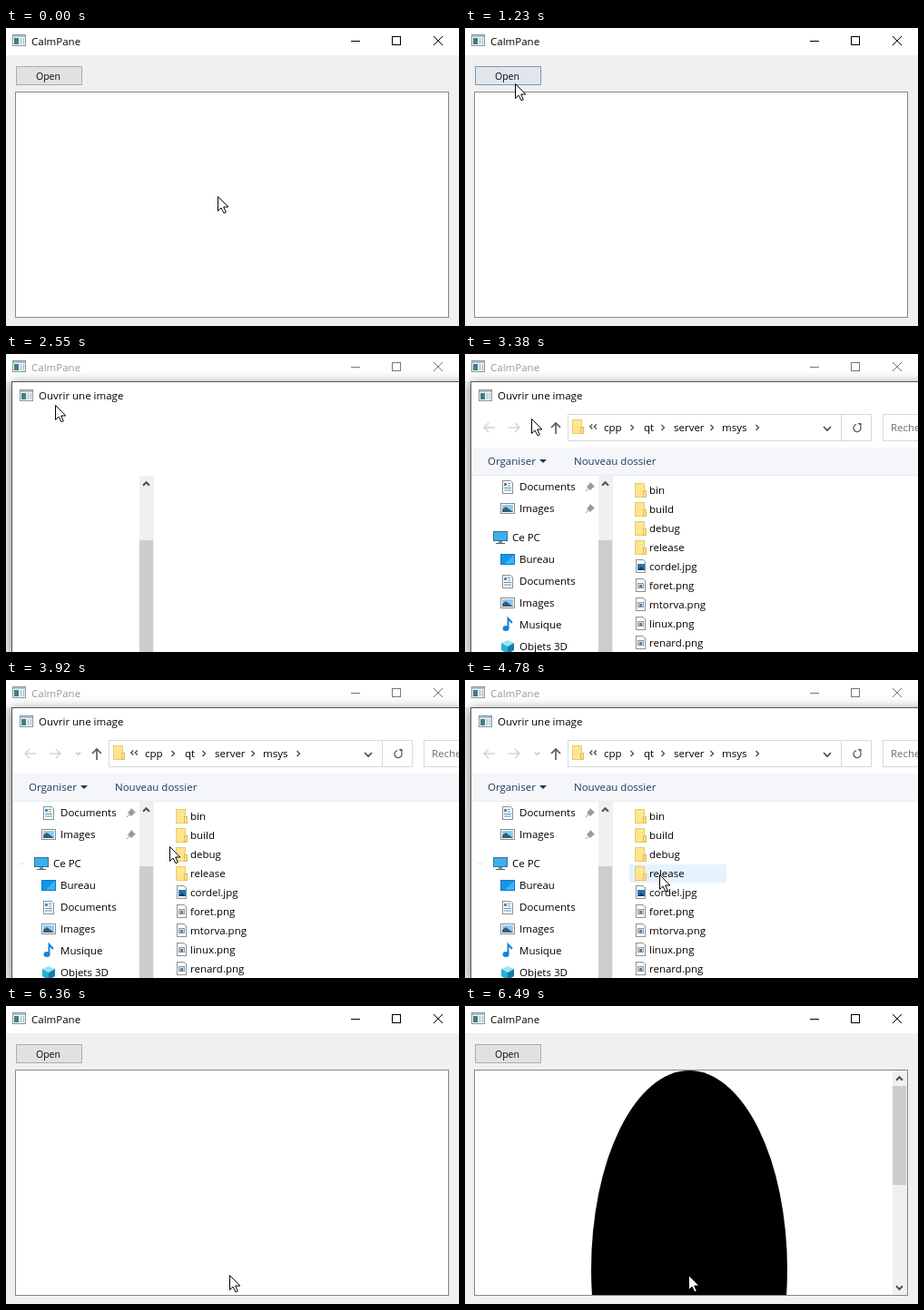
These frames come from a looping animation (499x328 px, 8 s). An HTML page with a canvas:

```html
<!DOCTYPE html>
<html lang="fr">
<head>
<meta charset="utf-8">
<title>Open dialog</title>
<style>
html, body { margin: 0; width: 100%; height: 100%; overflow: hidden; }
canvas { display: block; }
</style>
</head>
<body>
<canvas id="stage" width="499" height="328"></canvas>
<script>
const ctx = document.getElementById('stage').getContext('2d', { alpha: false });
const LOOP = 8000;

// [start time, tip x, tip y]
const pointerSteps = [
  [0, 233, 185], [500, 130, 137], [650, 75, 94], [800, 69, 78], [1230, 55, 61],
  [1620, 54, 56], [2820, 58, 57], [3100, 64, 65], [3250, 69, 68], [3380, 73, 71],
  [3530, 99, 112], [3680, 157, 146], [3800, 211, 175], [3920, 180, 183],
  [4350, 190, 185], [4780, 214, 214], [5230, 294, 318], [5380, 294, 309],
  [5530, 277, 308], [5660, 263, 303], [5810, 245, 297], [5960, 246, 296]
];
// [start time, fill, border]
const buttonSteps = [
  [0, '#e1e1e1', '#adadad'], [1230, '#e2e6ea', '#749cbb'], [1350, '#e4ecf3', '#3a8ac9'],
  [1470, '#e5f1fb', '#0078d7'], [1870, '#cce4f7', '#005499'],
  [2020, '#d7e2ec', '#5a81a3'], [2150, '#e1e1e1', '#adadad']
];
// [start time, highlighted row, fill]
const hoverSteps = [
  [0, -1], [4350, 2, '#e5f3ff'], [4780, 3, '#e5f3ff'], [5230, -1],
  [5530, 8, '#e5f3ff'], [5660, 7, '#e5f3ff'], [6210, 7, '#cce8ff']
];
const files = ['bin', 'build', 'debug', 'release', 'cordel.jpg', 'foret.png',
  'mtorva.png', 'linux.png', 'renard.png'];

const at = (steps, t) => steps.findLast(s => s[0] <= t);

function rect(x, y, w, h, fill, border) {
  ctx.fillStyle = border || fill;
  ctx.fillRect(x, y, w, h);
  if (border) rect(x + 1, y + 1, w - 2, h - 2, fill);
}

function line(points, color, width = 1) {
  ctx.beginPath();
  for (let i = 0; i < points.length; i += 2) ctx.lineTo(points[i], points[i + 1]);
  ctx.strokeStyle = color;
  ctx.lineWidth = width;
  ctx.stroke();
}

function poly(points, fill) {
  ctx.beginPath();
  for (let i = 0; i < points.length; i += 2) ctx.lineTo(points[i], points[i + 1]);
  ctx.closePath();
  ctx.fillStyle = fill;
  ctx.fill();
}

function text(s, x, y, color = '#000', size = 11.5) {
  ctx.font = `${size}px "Open Sans", "Noto Sans", sans-serif`;
  ctx.fillStyle = color;
  ctx.fillText(s, x, y);
}

// Chevrons centred on x, y
const vertical = (x, y, d, color, w = 1.5, r = 3.5) =>
  line([x - r, y - d * r / 2, x, y + d * r / 2, x + r, y - d * r / 2], color, w);
const sideways = (x, y, d, r = 3) =>
  line([x - d * r / 2, y - r, x + d * r / 2, y, x - d * r / 2, y + r], '#444', 1.2);

function appIcon(x, y) {
  rect(x, y, 15, 13, '#f4f6f8', '#8b949c');
  rect(x + 1, y + 1, 13, 2, '#a9c0d4');
  rect(x + 2, y + 4, 5, 7, '#3d8080');
  rect(x + 8, y + 4, 3, 7, '#c9d8e2');
  rect(x + 12, y + 4, 1, 7, '#aab4bb');
}

function folder(x, y) {
  rect(x, y, 11, 16, '#ffe591', '#eccb63');
  rect(x + 9, y + 8, 4, 8, '#ffe08a', '#e3bd50');
}

function page(x, y, w = 11) {
  rect(x, y, w, 15, '#fff', '#8f8f8f');
  poly([x + w - 3, y, x + w, y, x + w, y + 3], '#fff');
  line([x + w - 3, y + .5, x + w - .5, y + 3], '#8f8f8f');
}

function fileIcon(name, x, y) {
  if (!name.includes('.')) return folder(x - 1, y);
  page(x, y);
  if (name.endsWith('jpg')) {
    rect(x + 2, y + 5, 8, 7, '#1c78b8');
    poly([x + 2, y + 12, x + 6, y + 8, x + 10, y + 12], '#123d5a');
  } else {
    rect(x + 2, y + 5, 7, 6, '#d5e2ec', '#8a98a3');
    rect(x + 4, y + 7, 3, 3, '#4f83b0');
  }
}

const treeIcons = {
  doc(x, y) {
    page(x + 2, y - 7, 12);
    rect(x + 4, y - 4, 3, 3, '#3f8fc4');
    for (let i = 0; i < 4; i++) rect(x + 4 + (i < 2 ? 4 : 0), y - 4 + i * 2.5, i < 2 ? 3 : 8, 1, '#5c8eae');
  },
  image(x, y) {
    rect(x, y - 6, 16, 12, '#fff', '#8a8a8a');
    rect(x + 2, y - 4, 12, 8, '#8ecbf3');
    poly([x + 2, y + 4, x + 2, y + 1, x + 6, y - 2, x + 14, y + 4], '#355f76');
  },
  computer(x, y) {
    rect(x, y - 7, 16, 11, '#3cb0ee', '#3b6d8f');
    rect(x + 6, y + 4, 4, 2, '#7c8d99');
    rect(x + 3, y + 6, 10, 1, '#4c606d');
  },
  desktop(x, y) {
    rect(x, y - 6, 16, 12, '#1795e5', '#0878c8');
    poly([x + 5, y + 5, x + 15, y - 5, x + 15, y + 5], '#3eb4f5');
  },
  music(x, y) {
    ctx.beginPath();
    ctx.ellipse(x + 6, y + 4, 3.5, 3, 0, 0, 7);
    ctx.fillStyle = '#1683d8';
    ctx.fill();
    line([x + 8.5, y + 4, x + 8.5, y - 7, x + 13, y - 2], '#1683d8', 2);
  },
  cube(x, y) {
    poly([x + 8, y - 7, x + 15, y - 4, x + 8, y, x + 1, y - 4], '#9be4f3');
    poly([x + 1, y - 4, x + 8, y, x + 8, y + 8, x + 1, y + 4], '#25b1d3');
    poly([x + 15, y - 4, x + 8, y, x + 8, y + 8, x + 15, y + 4], '#117fa8');
  }
};
// [icon, icon x, centre y, label]
const tree = [
  ['doc', 39, 146, 'Documents'], ['image', 39, 170, 'Images'], ['computer', 31, 202, 'Ce PC'],
  ['desktop', 39, 226, 'Bureau'], ['doc', 39, 250, 'Documents'], ['image', 39, 274, 'Images'],
  ['music', 39, 298, 'Musique'], ['cube', 39, 322, 'Objets 3D']
];

function pin(x, y) {
  poly([x, y - 5, x + 5, y, x + 3, y + 1, x, y + 4, x - 4, y, x - 1, y - 3], '#949ba1');
  line([x - 2, y + 2, x - 5, y + 5], '#949ba1');
}

function appWindow(t) {
  const active = t < 2020 || t >= 6360;
  const ink = active ? '#000' : '#777';
  rect(0, 0, 499, 328, '#f0f0f0');
  rect(0, 0, 499, 30, '#fff');
  appIcon(7, 7);
  text('CalmPane', 28, 19, active ? '#000' : '#999');
  line([380, 14.5, 390, 14.5], ink);
  ctx.strokeRect(425.5, 9.5, 9, 9);
  line([471, 9, 481, 19], ink);
  line([481, 9, 471, 19], ink);

  const [, fill, border] = at(buttonSteps, t);
  rect(11, 42, 73, 21, fill, border);
  text('Open', 33, 57, '#000018', 10.5);
  rect(10, 70, 478, 249, '#fff', '#828790');
  if (t >= 6490) picture();
}

function picture() {
  ctx.save();
  ctx.beginPath();
  ctx.rect(11, 71, 460, 247);
  ctx.clip();
  ctx.beginPath();
  ctx.ellipse(247, 290, 108, 219, 0, 0, 7);
  ctx.fillStyle = '#000';
  ctx.fill();
  ctx.restore();
  rect(471, 71, 16, 247, '#f0f0f0');
  rect(471, 88, 15, 109, '#cdcdcd');
  vertical(478.5, 80, -1, '#505050', 2);
  vertical(478.5, 310, 1, '#505050', 2);
}

function dialog(t) {
  ctx.save();
  ctx.shadowColor = 'rgba(0,0,0,.45)';
  ctx.shadowBlur = 12;
  ctx.shadowOffsetY = 2;
  rect(6, 30, 500, 300, '#555');
  ctx.restore();
  rect(7, 31, 500, 300, '#fff');
  appIcon(15, 39);
  text('Ouvrir une image', 36, 50);
  if (t >= 2670) {
    navigation(t);
    toolbar(t);
    lists(t);
  }
  rect(147, 134, 16, 194, '#f0f0f0');
  rect(147, 205, 15, 123, '#cdcdcd');
  vertical(154.5, 143, -1, '#505050', 2);
}

function navigation(t) {
  const pale = '#d0d0d0', dark = '#555';
  line([33, 81, 21, 81], pale, 1.4);
  line([26, 76, 21, 81, 26, 86], pale, 1.4);
  line([48, 81, 60, 81], pale, 1.4);
  line([55, 76, 60, 81, 55, 86], pale, 1.4);
  vertical(79.5, 81, 1, '#bbb', 1.2, 2.5);
  line([100, 88, 100, 76], dark, 1.6);
  line([95, 81, 100, 76, 105, 81], dark, 1.6);

  rect(113, 66, 335, 30, '#fff', '#d9d9d9');
  rect(414, 67, 1, 28, '#d9d9d9');
  folder(118, 72);
  sideways(139, 80, -1, 2.5);
  sideways(143.5, 80, -1, 2.5);
  text('cpp', 153, 85);
  text('qt', 197, 85);
  text('server', 230, 85);
  text('msys', 283, 85);
  for (const x of [184, 218, 272]) sideways(x, 81, 1);
  if (t >= 2820) sideways(322, 81, 1);
  vertical(399, 82, 1, '#444', 1.6, 4);

  ctx.beginPath();
  ctx.arc(432, 81.5, 4, -.5, 4.5);
  ctx.strokeStyle = dark;
  ctx.lineWidth = 1.4;
  ctx.stroke();
  poly([432.5, 76, 436.5, 76, 436.5, 80], dark);

  rect(460, 66, 60, 30, '#fff', '#d9d9d9');
  text('Rechercher', 469, 85, '#6d6d6d');
}

function toolbar(t) {
  rect(7, 103, 492, 30, '#f4f6f9');
  rect(7, 133, 492, 1, '#e9ecef');
  if (t >= 3530 && t < 3680) rect(10, 105, 92, 26, '#e5f3ff', '#cce8ff');
  text('Organiser', 25, 122, '#1e395b');
  poly([82, 116, 90, 116, 86, 120], '#1e395b');
  text('Nouveau dossier', 120, 122, '#1e395b');
}

function lists(t) {
  for (const [icon, x, y, label] of tree) {
    treeIcons[icon](x, y);
    text(label, x + 21, y + 4);
  }
  pin(138, 146);
  pin(138, 170);
  if (t >= 3800) vertical(17, 202, 1, '#ddd', 1, 3);

  const [, hovered, fill] = at(hoverSteps, t);
  files.forEach((name, i) => {
    const y = 140 + i * 21;
    if (i === hovered) rect(181, y, 107, 20, fill);
    fileIcon(name, 188, y + 2);
    text(name, 203, y + 14);
  });
}

function pointer(t) {
  const [, x, y] = at(pointerSteps, t);
  const shape = [0, 0, 0, 16, 3.5, 12.5, 6.5, 18.3, 8.8, 17.3, 6.2, 11.5, 11.3, 11.5, 0, 0]
    .map((v, i) => v + (i % 2 ? y : x) + .5);
  poly(shape, '#fff');
  line(shape, '#000');
}

function draw() {
  const t = performance.now() % LOOP;
  appWindow(t);
  if (t >= 2550 && t < 6360) dialog(t);
  pointer(t);
  requestAnimationFrame(draw);
}
draw();
</script>
</body>
</html>
```
